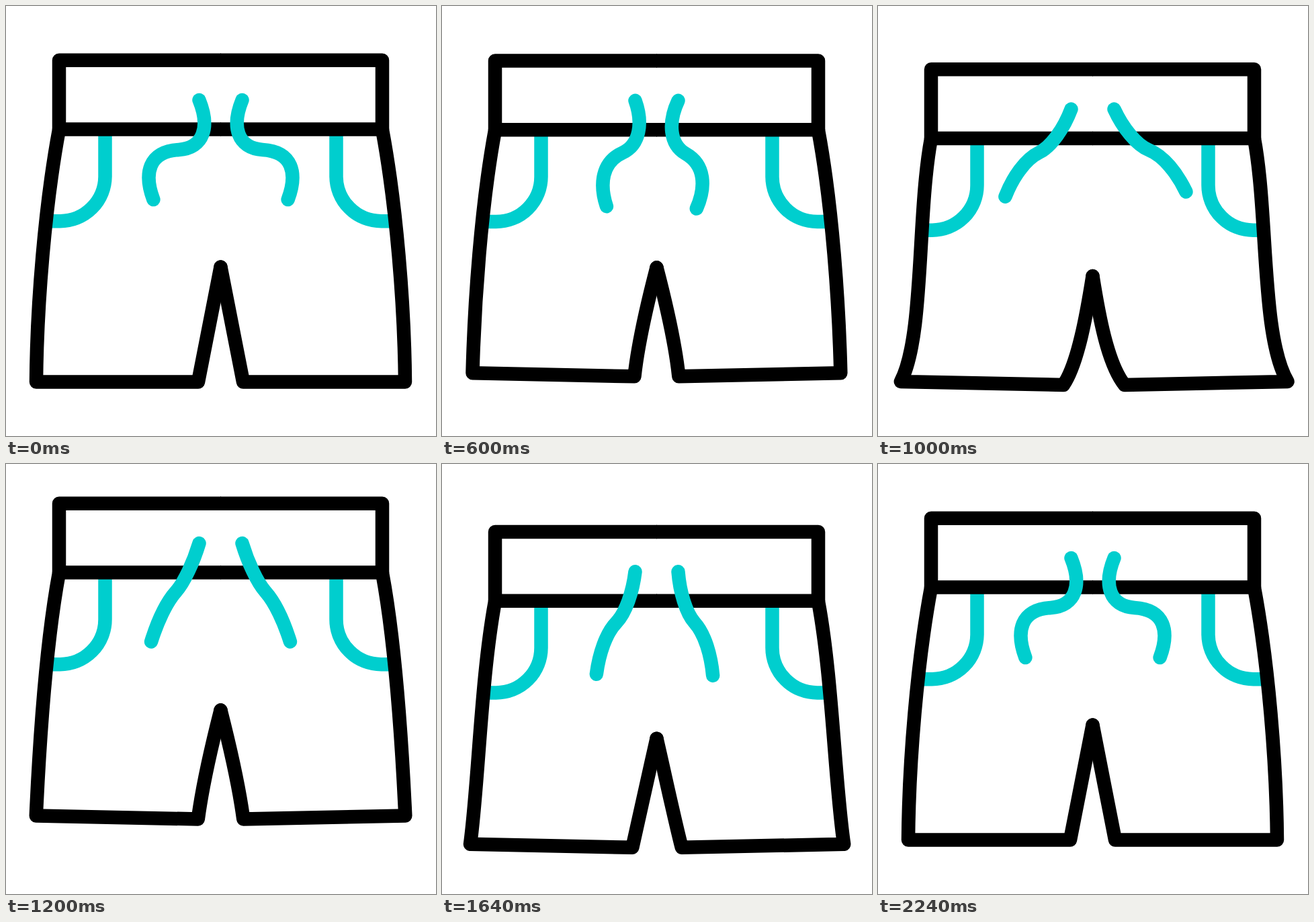
An HTML page for the animation above (2320 ms loop, 640x640 px).

```html
<!DOCTYPE html>
<html lang="en">
<head>
<meta charset="utf-8">
<title>Shorts</title>
<style>
  html, body { margin: 0; height: 100%; overflow: hidden; background: #fff; }
  svg { display: block; width: 100%; height: 100%; }
  path { fill: none; stroke: #000; stroke-width: 20.5; stroke-linejoin: round; }
  .teal { stroke: #00cece; }
  .round { stroke-linecap: round; }
</style>
</head>
<body>
<svg viewBox="0 0 640 640"><g id="shorts"></g></svg>
<script>
const LOOP = 2320, STEP = 40, END = 2240;

// Turning points as [time, value]
const bounce = [[0, 0], [350, -45], [830, 41], [1200, -22], [1560, 21], [END, 0]];
const flare = [[0, 0], [420, -6.5], [900, 13], [1390, -6], [1640, 3], [END, 0]];
const lift = [[0, 0], [300, 1], [1700, 1], [END, 0]];
const wave = [[0, 33], [1400, 3.5], [1920, 13], [END, 33]];
const swingLeft = [[0, 24.7], [420, 9], [1000, 37], [1400, 15], [1920, 28], [END, 24.7]];
const swingRight = [[0, 24.7], [560, 9], [1000, 41], [1400, 11], [1920, 28], [END, 24.7]];

function ease(keys, t) {
  const i = Math.max(1, keys.findIndex(([k]) => k >= t));
  const [t0, a] = keys[i - 1], [t1, b] = keys[i];
  return a + (b - a) * (1 - Math.cos(Math.PI * (t - t0) / (t1 - t0))) / 2;
}

// Outer seam, hem and inner seam of one leg; f spreads the hem, up raises it
function leg(f, spread, up) {
  const hemX = 286 - .9 * spread, hemY = 559.5 - 9 * up;
  return `M79 184C58 297 ${49 + 1.8 * f - 3 * (1 - up)} ${445 + 3 * f}
    ${45 - spread} ${559.5 - 14 * up}L${hemX} ${hemY}
    C${297 - 5 * up + .5 * f} ${502 + 1.5 * f} ${308 - 3 * up + .5 * f} 445 319.5 388.5`;
}

// An S-shaped wave along a swinging line of fixed length
function cord(degrees, w) {
  const a = degrees * Math.PI / 180, sin = Math.sin(a), cos = Math.cos(a);
  const at = (along, side) => {
    const u = 163 * along, v = w * side;
    return [287.5 - u * sin + v * cos, 140 + u * cos + v * sin];
  };
  return `M${at(0, 0)}C${[at(.18, .95), at(.38, 1.1), at(.49, .1),
    at(.62, -1.1), at(.82, -.9), at(1, 0)]}`;
}

// Left half; the right one is its mirror image with a wider reach
function half(t, swing, reach) {
  const f = ease(flare, t);
  return `<path class="teal" d="M147.5 184V253.2A67 67 0 0 1 80.5 320.2H60"/>
    <path d="M320 80.8H79V183.5H320"/>
    <path class="round" d="${leg(f, f * reach, ease(lift, t))}"/>
    <path class="teal round" d="${cord(ease(swing, t), ease(wave, t))}"/>`;
}

const shorts = document.getElementById("shorts");

function draw(t) {
  shorts.setAttribute("transform", `translate(0 ${ease(bounce, t)})`);
  shorts.innerHTML = half(t, swingLeft, 1)
    + `<g transform="matrix(-1 0 0 1 639 0)">${half(t, swingRight, 1.4)}</g>`;
}

const began = performance.now();
function tick() {
  const t = (performance.now() - began) % LOOP;
  draw(Math.min(END, Math.floor(t / STEP) * STEP));
  requestAnimationFrame(tick);
}
tick();
</script>
</body>
</html>
```
